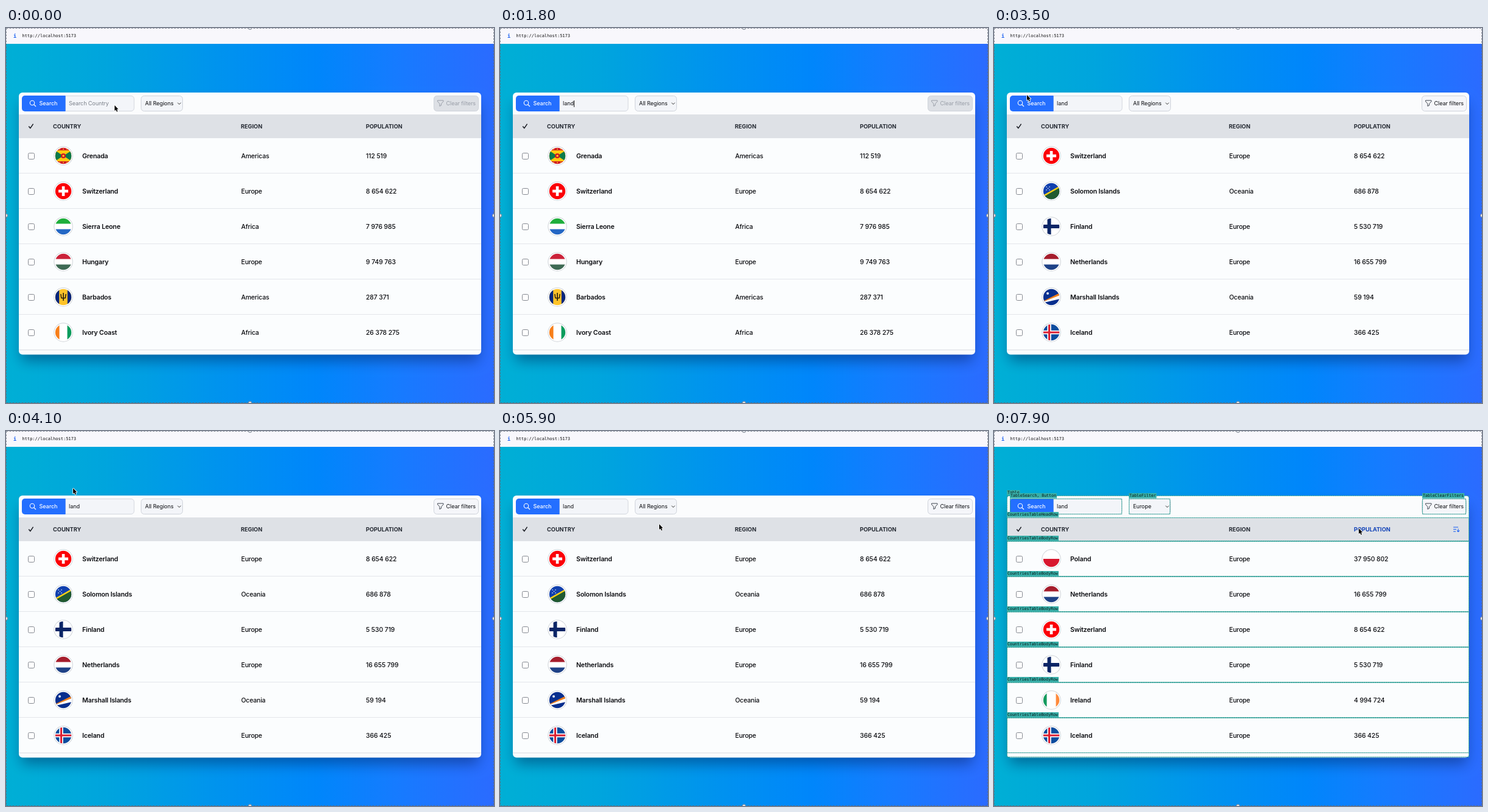
These frames come from a looping animation (800 px wide and 616 px high, 8000 ms). An HTML page with a canvas:

```html
<!DOCTYPE html>
<html lang="en">
<head>
<meta charset="utf-8">
<title>Countries table</title>
<style>
html, body { margin: 0; width: 100%; height: 100%; overflow: hidden; background: #0090f0; }
canvas { display: block; width: 800px; height: 616px; }
</style>
</head>
<body>
<canvas id="stage" width="800" height="616"></canvas>
<script>
const ctx = document.getElementById('stage').getContext('2d');
const LOOP = 8000;
const SANS = 'Inter, "Liberation Sans", sans-serif';
const MONO = '"DejaVu Sans Mono", monospace';
const TEAL = '#37afa9';
const BLUE = '#246fff';
const INK = '#0b0c10';
const ROW_H = 58;
const ROW_TOP = 181;

// ---- drawing helpers ----
function rect(x, y, w, h, fill) {
  ctx.fillStyle = fill;
  ctx.fillRect(x, y, w, h);
}
function round(x, y, w, h, r, fill, stroke) {
  ctx.beginPath();
  ctx.roundRect(x, y, w, h, r);
  if (fill) { ctx.fillStyle = fill; ctx.fill(); }
  if (stroke) { ctx.strokeStyle = stroke; ctx.lineWidth = 1; ctx.stroke(); }
}
function disc(x, y, r, fill) {
  ctx.beginPath();
  ctx.arc(x, y, r, 0, Math.PI * 2);
  ctx.fillStyle = fill;
  ctx.fill();
}
function poly(fill, ...p) {
  ctx.beginPath();
  for (let i = 0; i < p.length; i += 2) ctx.lineTo(p[i], p[i + 1]);
  ctx.closePath();
  ctx.fillStyle = fill;
  ctx.fill();
}
function line(color, width, ...p) {
  ctx.beginPath();
  for (let i = 0; i < p.length; i += 2) ctx.lineTo(p[i], p[i + 1]);
  ctx.strokeStyle = color;
  ctx.lineWidth = width;
  ctx.stroke();
}
function text(str, x, y, font, color, spacing = 0) {
  ctx.font = font;
  ctx.letterSpacing = spacing + 'px';
  ctx.fillStyle = color;
  ctx.fillText(str, x, y);
}

// ---- flags, drawn around 0,0 inside a circle of radius 13 ----
const bands = (a, b, c, s = 4.5) => () => {
  rect(-14, -14, 28, 28, b);
  rect(-14, -14, 28, 14 - s, a);
  rect(-14, s, 28, 14 - s, c);
};
const pales = (a, b, c, s) => () => {
  rect(-14, -14, 28, 28, b);
  rect(-14, -14, 14 - s, 28, a);
  rect(s, -14, 14 - s, 28, c);
};
function cross(cx, w, color) {
  rect(cx - w / 2, -14, w, 28, color);
  rect(-14, -w / 2, 28, w, color);
}
const flags = {
  grenada() {
    rect(-14, -14, 28, 28, '#ce1526');
    rect(-14, -9, 28, 18, '#ffc90e');
    poly('#0b7a4b', -14, -9, 0, 0, -14, 9);
    poly('#0b7a4b', 14, -9, 0, 0, 14, 9);
    disc(0, 0, 4, '#ce1526');
    disc(0, 0, 1.7, '#ffd21a');
    for (const y of [-11, 11]) for (const x of [-6, 0, 6]) disc(x, y, 0.9, '#ffd21a');
  },
  swiss() {
    rect(-14, -14, 28, 28, '#fb0007');
    rect(-8, -2.3, 16, 4.6, '#fff');
    rect(-2.3, -8, 4.6, 16, '#fff');
  },
  sierra: bands('#1fae3c', '#fff', '#2467c4'),
  hungary: bands('#cb2239', '#fff', '#3f6a54'),
  dutch: bands('#a51d2c', '#fff', '#1f4287'),
  ivory: pales('#f77f1a', '#fff', '#0a9c5c', 6.5),
  irish: pales('#149a5e', '#fff', '#ff8a3c', 7.5),
  barbados() {
    pales('#06267c', '#ffc328', '#06267c', 6.8)();
    line('#15110a', 1.5, 0, -7, 0, 6);
    line('#15110a', 1.4, -4.2, -5, -3.2, 1.6, 3.2, 1.6, 4.2, -5);
  },
  solomon() {
    rect(-14, -14, 28, 28, '#1040ae');
    poly('#215a30', -14, 9, 14, -7, 14, 14, -14, 14);
    line('#fcd116', 2.4, -14, 8.5, 14, -7.5);
    for (const [x, y] of [[-8, -7], [-3, -7], [-5.5, -4.5], [-8, -2], [-3, -2]]) disc(x, y, 0.8, '#fff');
  },
  finland() {
    rect(-14, -14, 28, 28, '#fff');
    cross(-3.5, 6, '#0b2566');
  },
  marshall() {
    rect(-14, -14, 28, 28, '#082f8e');
    poly('#f07f1c', -14, 7, 14, -7, 14, -2, -14, 8);
    poly('#fff', -14, 8, 14, -3, 14, 3, -14, 9.5);
    disc(-6, -6, 2, '#e8edf8');
  },
  iceland() {
    rect(-14, -14, 28, 28, '#0c4c9e');
    cross(-3.5, 6.4, '#fff');
    cross(-3.5, 3, '#dc2033');
  },
  poland() {
    rect(-14, -14, 28, 14, '#fff');
    rect(-14, 0, 28, 14, '#d8182f');
  }
};

const countries = {
  Grenada: ['grenada', 'Americas', 112519],
  Switzerland: ['swiss', 'Europe', 8654622],
  'Sierra Leone': ['sierra', 'Africa', 7976985],
  Hungary: ['hungary', 'Europe', 9749763],
  Barbados: ['barbados', 'Americas', 287371],
  'Ivory Coast': ['ivory', 'Africa', 26378275],
  'Solomon Islands': ['solomon', 'Oceania', 686878],
  Finland: ['finland', 'Europe', 5530719],
  Netherlands: ['dutch', 'Europe', 16655799],
  'Marshall Islands': ['marshall', 'Oceania', 59194],
  Iceland: ['iceland', 'Europe', 366425],
  Ireland: ['irish', 'Europe', 4994724],
  Poland: ['poland', 'Europe', 37950802]
};
const all = ['Grenada', 'Switzerland', 'Sierra Leone', 'Hungary', 'Barbados', 'Ivory Coast'];
const found = ['Switzerland', 'Solomon Islands', 'Finland', 'Netherlands', 'Marshall Islands', 'Iceland'];
const europe = ['Switzerland', 'Finland', 'Netherlands', 'Iceland', 'Ireland', 'Poland'];
const sorted = [...europe].sort((a, b) => countries[b][2] - countries[a][2]);
const digits = n => String(n).replace(/\B(?=(\d{3})+$)/g, ' ');

// ---- timeline ----
const TYPE_AT = [900, 1150, 1350, 1600];
const FOCUS = 500, SEARCH = 2750, FILTER = 6300, SORT = 7750;
const FLASH = 350;
const path = [
  [0, 178, 127], [2000, 178, 127], [2550, 40, 114], [3300, 40, 114], [4000, 110, 94],
  [4400, 110, 94], [5000, 255, 124], [5400, 255, 124], [5850, 261, 153], [6250, 261, 153],
  [6750, 439, 114], [7000, 439, 114], [7600, 598, 160], [LOOP, 598, 160]
];
function pointerAt(t) {
  const i = path.findIndex(k => k[0] > t);
  const [t0, x0, y0] = path[i - 1], [t1, x1, y1] = path[i];
  const u = (t - t0) / (t1 - t0), e = u * u * (3 - 2 * u);
  return { x: x0 + (x1 - x0) * e, y: y0 + (y1 - y0) * e, shown: t < TYPE_AT[0] || t >= 2000 };
}

// ---- parts of the page ----
function backdrop() {
  const g = ctx.createLinearGradient(0, 0, 800, 0);
  [[0, '#00afd5'], [0.2, '#00a5dd'], [0.45, '#0092ef'], [0.64, '#0086fb'], [0.8, '#167bff'], [1, '#2b6bff']]
    .forEach(s => g.addColorStop(...s));
  rect(0, 0, 800, 616, g);
  rect(0, 0, 800, 26, '#f8f7fc');
  text('i', 12, 14, 'bold 8.5px ' + MONO, '#1a5ff0');
  text('http://localhost:5173', 26.5, 13.5, '7px ' + MONO, '#111');
}
function frameEdge() {
  ctx.setLineDash([3, 2]);
  ctx.strokeStyle = 'rgba(90,100,115,.75)';
  ctx.lineWidth = 1;
  ctx.strokeRect(0.5, 0.5, 799, 615);
  ctx.setLineDash([]);
  for (const [x, y] of [[400, 0], [0, 308], [800, 308], [400, 616]]) {
    disc(x, y, 3, '#8b929c');
    disc(x, y, 2, '#e4e7ec');
  }
}
function card() {
  ctx.save();
  ctx.shadowColor = 'rgba(0,20,70,.42)';
  ctx.shadowBlur = 22;
  ctx.shadowOffsetY = 11;
  round(25, 112, 750, 424, 6, '#fff');
  ctx.restore();
  round(21, 106, 758, 430.5, 6, '#fbfcfd');
}
function chevron(x, y) {
  line('#333', 1, x - 2.7, y - 1.3, x, y + 1.4, x + 2.7, y - 1.3);
}
function toolbar(t, p) {
  const hover = p.shown && p.x >= 26 && p.x < 97 && p.y >= 111 && p.y < 137;
  const typed = 'land'.slice(0, TYPE_AT.filter(k => t >= k).length);
  const small = '9px ' + SANS;
  const medium = '500 9px ' + SANS;

  round(97.5, 111.5, 112.5, 25, [0, 5, 5, 0], '#f3f5f9', '#d3d7de');
  round(26, 111, 71.5, 26, [5, 0, 0, 5], hover ? '#153fae' : BLUE);
  ctx.beginPath();
  ctx.arc(43, 123, 3.7, 0, Math.PI * 2);
  ctx.strokeStyle = '#fff';
  ctx.lineWidth = 1.1;
  ctx.stroke();
  line('#fff', 1.2, 45.7, 125.7, 49, 129);
  text('Search', 54.5, 124.5, medium, '#fff', -0.05);

  if (typed) text(typed, 103, 124.5, small, INK, -0.05);
  else text('Search Country', 103, 124.5, small, '#7b808a', -0.08);
  if (t >= FOCUS && t < SEARCH && (t < 700 || t > 1000 && t < 2250 || t > 2600)) {
    ctx.font = small;
    rect(Math.round(103 + (typed ? ctx.measureText(typed).width : 0)), 119, 1, 11, '#222');
  }

  round(221.5, 111.5, 68, 25, 5, '#f3f5f9', '#cfd3da');
  text(t < FILTER ? 'All Regions' : 'Europe', 228, 124.5, small, INK, -0.05);
  chevron(284, 124);

  const off = t < SEARCH;
  const ink = off ? '#989da7' : INK;
  round(701.5, 111.5, 73, 25, 5, off ? '#dde0e5' : '#f5f6fa', '#cfd3da');
  ctx.lineJoin = 'round';
  line(off ? ink : '#3d434d', 1, 707.5, 119, 717, 119, 717, 120.7, 713.6, 124.4, 713.6, 127, 710.9, 128.4, 710.9, 124.4, 707.5, 120.7, 707.5, 119);
  text('Clear filters', 721.5, 124.5, small, ink, -0.05);
}
function head(t) {
  const font = '700 9.2px ' + SANS;
  const isSorted = t >= SORT;
  rect(21, 142, 758, 39, '#dee1e6');
  line('#171a20', 1.5, 37.3, 161.6, 39.8, 164.6, 44.6, 157.6);
  text('COUNTRY', 77, 162, font, '#252a33');
  text('REGION', 385, 162, font, '#252a33');
  text('POPULATION', 590, 162, font, isSorted ? '#1243b8' : '#252a33');
  if (isSorted) {
    const c = '#2466f2';
    line(c, 1.1, 753, 158, 761, 158);
    line(c, 1.1, 753, 161.5, 758, 161.5);
    line(c, 1.1, 753, 165, 757, 165);
    line(c, 1.1, 761, 160.5, 761, 165.5);
    line(c, 1.1, 759, 163.5, 761, 165.5, 763, 163.5);
  }
}
function row(name, i) {
  const [flag, region, population] = countries[name];
  const y = ROW_TOP + i * ROW_H + 29;
  rect(21, y - 29, 758, 57, '#fbfdfe');
  rect(21, y + 28, 758, 1.5, '#e3e6ea');
  round(36.5, y - 4.5, 10, 10, 2, '#fff', '#858991');
  disc(94, y, 15.7, '#cfd3d8');
  disc(94, y, 14.7, '#fff');
  ctx.save();
  ctx.translate(94, y);
  ctx.beginPath();
  ctx.arc(0, 0, 13.2, 0, Math.PI * 2);
  ctx.clip();
  flags[flag]();
  ctx.restore();
  text(name, 125, y + 0.5, '600 10.6px ' + SANS, INK, -0.17);
  text(region, 385.5, y + 0.5, '500 10.5px ' + SANS, INK, -0.2);
  text(digits(population), 590, y + 0.5, '500 10.5px ' + SANS, INK, -0.14);
}

// ---- component update highlights ----
function outline(label, x, y, w, h) {
  ctx.strokeStyle = 'rgba(55,175,169,.45)';
  ctx.lineWidth = 1;
  ctx.strokeRect(x + 0.5, y + 0.5, w - 1, h - 1);
  ctx.setLineDash([2, 1]);
  ctx.strokeStyle = '#2e9c92';
  ctx.strokeRect(x + 0.5, y + 0.5, w - 1, h - 1);
  ctx.setLineDash([]);
  if (!label) return;
  rect(x, y - 9, label.length * 3.95 + 2, 8.5, TEAL);
  text(label, x + 1, y - 4.6, '6.56px ' + MONO, '#0b1716');
}
function highlights(rows) {
  outline('Table', 21, 106, 758, 430);
  outline('TableSearch, Button', 26, 111, 184, 26);
  outline('TableFilter', 221, 111, 68, 26);
  outline('TableClearFilters', 702, 111, 72, 26);
  outline('CountriesTableHeadRow', 21, 142, 758, 39);
  for (let i = 0; i < rows; i++) outline('CountriesTableBodyRow', 21, ROW_TOP + i * ROW_H, 758, ROW_H);
}
function pointer({ x, y }) {
  ctx.save();
  ctx.translate(x, y);
  ctx.lineJoin = 'round';
  const p = [0, 0, 0, 9, 2, 7.2, 3.6, 10.6, 5.1, 9.9, 3.6, 6.6, 6.3, 6.4, 0, 0];
  line('#fff', 1.6, ...p);
  poly('#000', ...p);
  ctx.restore();
}

function draw(t) {
  ctx.textBaseline = 'middle';
  const p = pointerAt(t);
  const rows = t < SEARCH ? all : t < FILTER ? found : t < SORT ? europe : sorted;
  backdrop();
  card();
  toolbar(t, p);
  head(t);
  rows.forEach(row);
  for (const at of [SEARCH, FILTER, SORT]) {
    if (t >= at && t < at + FLASH) highlights(at === SEARCH ? 8 : 6);
  }
  frameEdge();
  if (p.shown) pointer(p);
}

const start = performance.now();
function tick() {
  draw((performance.now() - start) % LOOP);
  requestAnimationFrame(tick);
}
tick();
</script>
</body>
</html>
```
